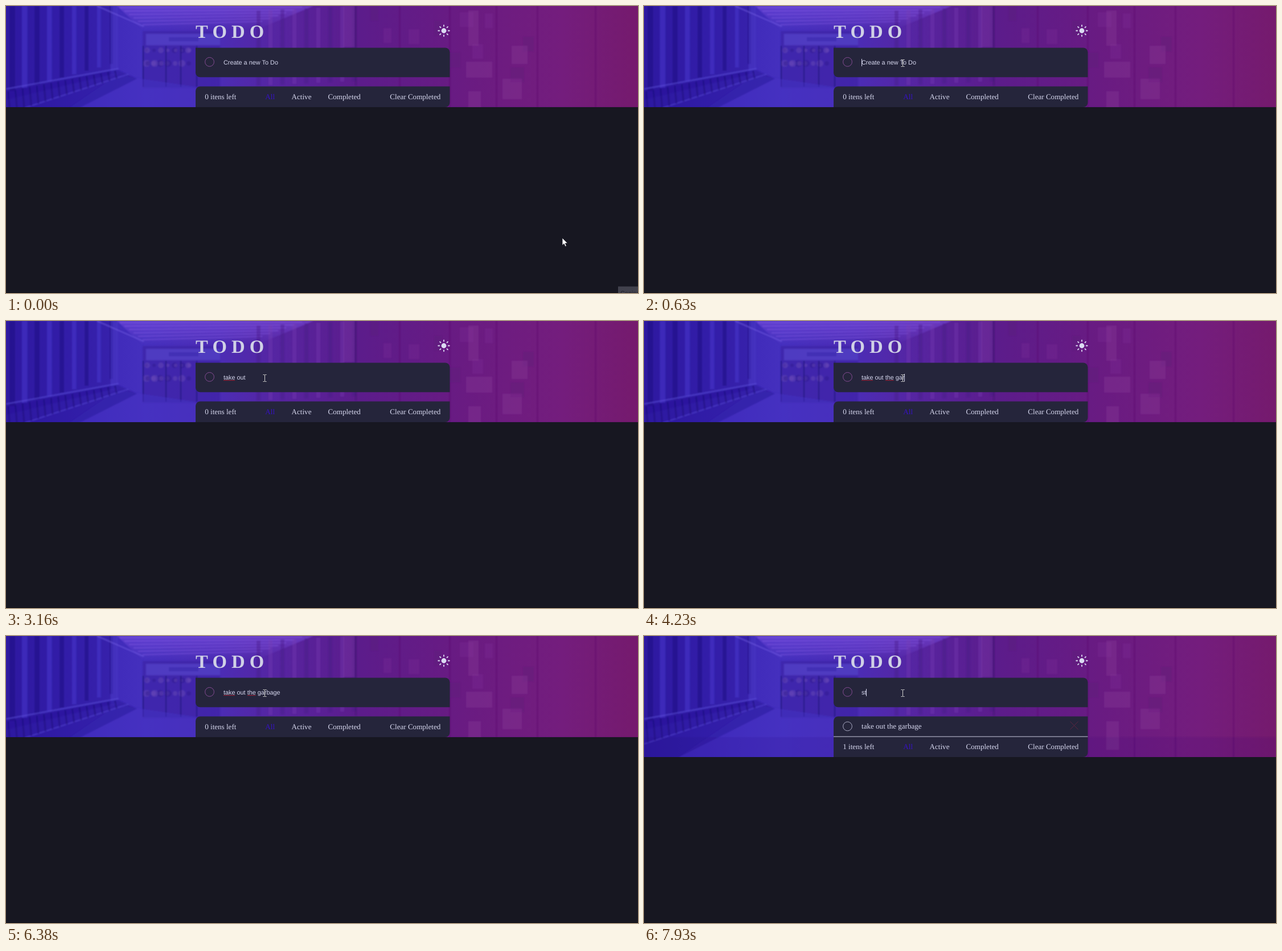
Animation of 1110 by 505 pixels, one loop 8 s. Source, as an HTML page:

```html
<!DOCTYPE html>
<html lang="en">
<head>
<meta charset="utf-8">
<title>Todo</title>
<style>
  html, body { margin: 0; width: 100%; height: 100%; overflow: hidden; background: #171721; }
  svg { display: block; width: 1110px; height: 505px; }
  text { text-rendering: geometricPrecision; fill: #d6d7ee; }
  .serif { font: 13.09px "Liberation Serif", "Times New Roman", serif; }
  .field { font: 10.87px "Liberation Sans", Arial, sans-serif; }
  .title { font: bold 32.73px "Liberation Serif", "Times New Roman", serif; letter-spacing: 8.18px; fill: #d0d1e6; }
  .card { fill: #25253b; }
  .ring { fill: none; stroke-width: 1; }
</style>
</head>
<body>
<svg viewBox="0 0 1110 505">
  <defs>
    <linearGradient id="tint">
      <stop offset="0" stop-color="#301ba6"/>
      <stop offset=".1" stop-color="#3823b5"/>
      <stop offset=".22" stop-color="#4530be"/>
      <stop offset=".34" stop-color="#4c2cb4"/>
      <stop offset=".44" stop-color="#57249f"/>
      <stop offset=".56" stop-color="#5c1c8b"/>
      <stop offset=".72" stop-color="#691b82"/>
      <stop offset=".88" stop-color="#741d7d"/>
      <stop offset="1" stop-color="#751a6d"/>
    </linearGradient>
    <linearGradient id="glow" x2="0" y2="1">
      <stop offset="0" stop-color="#7a4fe0" stop-opacity=".55"/>
      <stop offset="1" stop-color="#7a4fe0" stop-opacity="0"/>
    </linearGradient>
    <filter id="soft" x="-5%" y="-5%" width="110%" height="110%"><feGaussianBlur stdDeviation="1"/></filter>
    <clipPath id="crop"><rect id="cropBox" width="1110" height="178"/></clipPath>
  </defs>

  <rect width="1110" height="505" fill="#171721"/>
  <g clip-path="url(#crop)">
    <rect width="1110" height="214" fill="url(#tint)"/>
    <g id="photo" filter="url(#soft)"></g>
  </g>
  <rect y="504" width="1110" height="1" fill="#0d0d14"/>

  <text class="title" x="333" y="55.5">TODO</text>
  <g id="sun" transform="translate(769 43.5)" stroke="#dcdcf2" stroke-width="1.8" stroke-linecap="round">
    <circle r="4.4" fill="#dcdcf2" stroke="none"/>
  </g>

  <path class="card" d="M333 73.5H771.5a8 8 0 0 1 8 8V125.3H341a8 8 0 0 1-8-8Z"/>
  <circle class="ring" cx="357.5" cy="98.4" r="7.9" stroke="#854b94"/>
  <path id="marks" fill="none" stroke="#b8263a" stroke-width="1" opacity=".85"/>
  <text class="field" id="field" x="382" y="103"></text>
  <rect id="caret" y="93" width="1" height="13" fill="#d6d7ee"/>

  <path class="card" id="list"/>
  <g id="item">
    <circle class="ring" cx="357.5" cy="158.9" r="7.9" stroke="#a9a9c2"/>
    <text class="serif" x="382" y="163.2">take out the garbage</text>
    <path d="M748.5 150.5l14 14m0-14l-14 14" stroke="#5c2440" stroke-width="1" fill="none"/>
    <rect x="333" y="176.4" width="446.5" height="1.3" fill="#a3a3b8"/>
  </g>
  <g class="serif" id="footer">
    <text id="count" x="349.2" y="164"></text>
    <text x="455.3" y="164" style="fill:#3712c4">All</text>
    <text x="501.6" y="164">Active</text>
    <text x="565.5" y="164">Completed</text>
    <text x="674.3" y="164">Clear Completed</text>
  </g>

  <g id="badge">
    <rect x="1075" y="493.5" width="35" height="11.5" fill="#41414d"/>
    <text class="field" x="1079" y="508.5" style="fill:#1d1d28">Copied</text>
  </g>
  <path id="arrow" d="M0 0V13.2L3.1 10.4L5.2 15.2L7.4 14.3L5.3 9.6H9.4Z" fill="#fff" stroke="#15151f" stroke-width=".8"/>
  <path id="beam" d="M-3-5.5H-.7L0-5L.7-5.5H3M0-5V6M-3 6.5H-.7L0 6L.7 6.5H3" fill="none" stroke="#d2d2cf" stroke-width="1"/>
</svg>

<script>
const $ = id => document.getElementById(id);
const LOOP = 8000, ADDED = 6580;

function add(parent, tag, attrs) {
  const node = document.createElementNS("http://www.w3.org/2000/svg", tag);
  for (const k in attrs) node.setAttribute(k, attrs[k]);
  parent.appendChild(node);
}
const poly = (points, fill, opacity = 1) => add($("photo"), "polygon", { points, fill, opacity });
const box = (x, y, w, h, fill, opacity = 1) =>
  add($("photo"), "rect", { x, y, width: w, height: h, fill, opacity });
const line = (x1, y1, x2, y2, stroke, width = 1, opacity = 1) =>
  add($("photo"), "line", { x1, y1, x2, y2, stroke, "stroke-width": width, opacity });

function drawPhoto() {
  // colonnade on the left
  poly("0,0 195,0 195,118 0,165", "#2a1799", .45);
  for (let i = 0; i < 9; i++) {
    const x = 6 + i * 22, h = 150 - i * 6;
    box(x, 0, 10 - i * .5, h, i % 2 ? "#4a39cc" : "#221283", .55);
  }
  box(184, 0, 12, 122, "#5040cf", .5);
  // lit ceiling
  poly("195,0 540,0 440,42 240,42", "url(#glow)");
  for (let i = 0; i < 6; i++) line(200 + i * 8, 3 + i * 6, 520 - i * 14, 2 + i * 5, "#8a5fe6", 2, .4);
  line(160, 0, 242, 36, "#7a62e8", 2, .5);
  // doorway, sign and trees
  box(240, 44, 136, 100, "#3a22a0", .55);
  box(246, 49, 130, 20, "#5b49cf", .6);
  box(286, 55, 52, 7, "#3c2bae", .6);
  for (let i = 0; i < 22; i++) {
    const x = 246 + (i * 37) % 86, y = 78 + (i * 23) % 46;
    add($("photo"), "circle", { cx: x, cy: y, r: 3 + i % 4, fill: i % 3 ? "#7450b8" : "#2c188a", opacity: .4 });
  }
  for (const x of [240, 280, 306, 334]) box(x, 70, 2, 72, "#24127f", .8);
  // floor and railing
  poly("195,122 333,142 333,214 60,214", "#4732c4", .5);
  poly("0,150 195,112 230,128 60,214 0,214", "#28179a", .5);
  line(0, 146, 198, 110, "#5f50dc", 2, .6);
  line(0, 190, 215, 120, "#5848d4", 2, .55);
  for (let i = 0; i < 16; i++) {
    const x = 4 + i * 12.5;
    line(x, 150 - i * 2.4, x + 3, 188 - i * 4, "#1c0f78", 3, .5);
  }
  // wall on the right
  for (let i = 0; i < 9; i++) {
    const x = 440 + i * 21;
    box(x, 8 - i, 7, 132, i % 2 ? "#7a3fb4" : "#451680", .35);
  }
  box(592, 0, 20, 72, "#7b3aa6", .4);
  box(613, 0, 3, 140, "#401070", .5);
  for (let i = 0; i < 12; i++) {
    const x = 640 + (i * 67) % 290, y = (i * 41) % 110;
    box(x, y, 14 + i % 3 * 5, 26, i % 2 ? "#7f349a" : "#5a1876", .28);
  }
  for (const [x, y, w, h] of [[812, 8, 18, 62], [808, 98, 46, 28], [888, 70, 28, 32], [812, 150, 22, 50], [872, 128, 34, 36]])
    box(x, y, w, h, "#8b3a98", .35);
  for (const x of [690, 778, 860, 932, 1034]) box(x, 0, 3, 214, "#55136c", .3);
  box(0, 178, 1110, 36, "#2c1070", .12);
}

// [time, typed text, caret visible]
const typing = [
  [0, "", 0], [630, "", 1], [1150, "", 0], [1220, "t", 1], [1290, "ta", 1],
  [1560, "tak", 1], [1670, "take", 1], [1780, "take ", 1],
  [2040, "take o", 1], [2170, "take ou", 1], [2370, "take out", 1], [2570, "take out ", 1],
  [3160, "take out ", 0], [3310, "take out t", 1], [3500, "take out th", 1],
  [3600, "take out the", 1], [3700, "take out the ", 1],
  [3900, "take out the g", 1], [3970, "take out the ga", 1], [4230, "take out the gar", 1],
  [4370, "take out the garb", 1], [4500, "take out the garbg", 1], [4960, "take out the garbg", 0],
  [5030, "take out the garb", 1], [5510, "take out the garba", 1],
  [5780, "take out the garbag", 1], [5850, "take out the garbage", 1], [6380, "take out the garbage", 0],
  [6580, "", 0], [6910, "", 1], [7460, "", 0], [7730, "s", 1], [7930, "st", 1]
];

// [time, x, y, is text beam]
const pointer = [
  [0, 977, 408, 0], [70, 955, 372, 0], [150, 868, 262, 0], [230, 745, 150, 0], [310, 632, 78, 0],
  [390, 545, 49, 0], [470, 486, 72, 0], [550, 458, 96, 1], [630, 454, 100, 1]
];

const at = (steps, t) => steps.findLast(s => s[0] <= t);
const show = (id, on) => $(id).setAttribute("visibility", on ? "visible" : "hidden");

function render(t) {
  const [, text, caret] = at(typing, t);
  const field = $("field");
  field.textContent = (text || "Create a new To Do").replace(/ /g, "\u00a0");
  const end = text ? field.getComputedTextLength() : 0;
  $("caret").setAttribute("x", Math.floor(382.36 + end));
  show("caret", caret);

  let marks = "";
  if (text.startsWith("take ")) marks += "M382 104.5H402";
  if (text.startsWith("take out the ")) marks += "M424 104.5H438.5";
  $("marks").setAttribute("d", marks);

  const added = t >= ADDED, bottom = added ? 213 : 178;
  $("cropBox").setAttribute("height", bottom);
  $("list").setAttribute("d", `M341 141.5H779.5V${bottom - 8}a8 8 0 0 1-8 8H333V149.5a8 8 0 0 1 8-8Z`);
  $("footer").setAttribute("transform", `translate(0 ${added ? 35.3 : 0})`);
  $("count").textContent = `${added ? 1 : 0} itens left`;
  show("item", added);

  const [, x, y, beam] = at(pointer, t);
  $("arrow").setAttribute("transform", `translate(${x} ${y})`);
  $("beam").setAttribute("transform", `translate(${x + .5} ${y})`);
  show("arrow", !beam);
  show("beam", beam);
  show("badge", t < 70);
}

for (let i = 0; i < 8; i++)
  add($("sun"), "line", { y1: 7.8, y2: 9.8, transform: `rotate(${i * 45})` });
drawPhoto();

const start = performance.now();
function tick() {
  render((performance.now() - start) % LOOP);
  requestAnimationFrame(tick);
}
tick();
</script>
</body>
</html>
```
